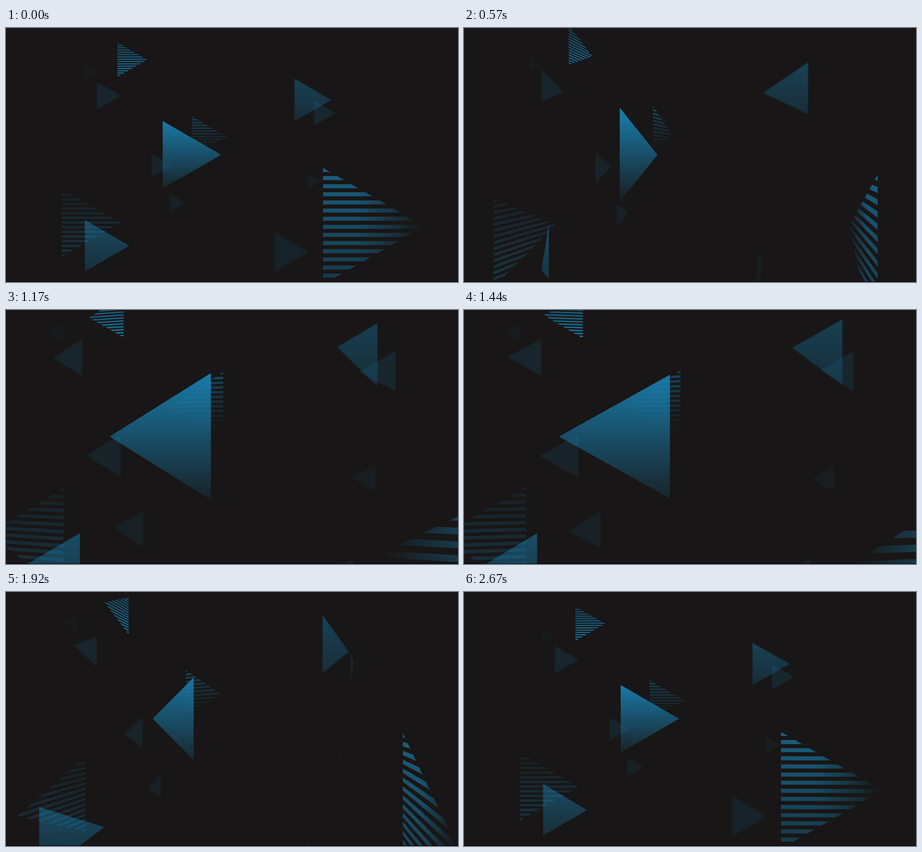
Recreate the animation shown at these times as an HTML page with a canvas. Size 998 px wide and 561 px high, loop 2700 ms.

```html
<!DOCTYPE html>
<html lang="en">
<head>
<meta charset="utf-8">
<title>Drifting triangles</title>
<style>
  html, body { margin: 0; width: 100%; height: 100%; overflow: hidden; background: #181616; }
  canvas { display: block; }
</style>
</head>
<body>
<canvas id="stage" width="998" height="561"></canvas>
<script>
const ctx = document.getElementById('stage').getContext('2d');
const W = 998, H = 561, CX = 499, CY = 280.5;
const FOCAL = 605, LOOP = 2700, HALF = LOOP / 2;
const BG = '24,22,22', BLUE = '26,126,173';

// x: flat edge, y: middle, h: height, k: approach at peak,
// a: alpha at top and bottom, turn: degrees in each half, gap: stripe period
const tri = (x, y, h, k, a, blur, extra = {}) =>
  ({ x, y, h, w: h * 0.866, k, a, blur, turn: [180, 180], ...extra });

const main = tri(346, 280, 149, 0.4755, [0.96, 0.13], 0.3);
const others = [
  tri(700, 438, 258, 0.435, [0.7, 0.32], 0.6, { gap: 17.95, fade: true }),
  tri(123, 430, 150, 0.336, [0.1, 0.27], 0.7, { gap: 10.3 }),
  tri(246, 70, 76, 0.218, [0.48, 0.9], 0.6, { gap: 5.1 }),
  tri(410, 240, 90, 0.414, [0.48, -0.1], 0.7, { gap: 6.2, turn: [180, -540] }),
  tri(174, 481, 114, 0.354, [0.52, 0.23], 0.6, { turn: [-180, 540] }),
  tri(637, 159, 94, 0.377, [0.42, 0.22], 0.8, { turn: [-540, 540] }),
  tri(680, 188, 56, 0.377, [0.16, 0.16], 1),
  tri(201, 149.5, 61, 0.264, [0.15, 0.15], 1.4),
  tri(172, 97, 36, 0.213, [0.06, 0.06], 2),
  tri(321, 303, 52, 0.475, [0.13, 0.13], 1.8),
  tri(361, 386, 42, 0.5, [0.11, 0.11], 2.2),
  tri(592, 495, 89, 0.375, [0.13, 0.13], 3.2),
  tri(666, 338, 38, 0.385, [0.08, 0.08], 2.2)
];

const smooth = s => s * s * (3 - 2 * s);

// cubic-bezier(.2, 0, .8, 1)
function softEase(x) {
  let lo = 0, hi = 1;
  for (let i = 0; i < 24; i++) {
    const s = (lo + hi) / 2, q = 1 - s;
    if (0.6 * s * q * q + 2.4 * s * s * q + s * s * s < x) lo = s; else hi = s;
  }
  return smooth(lo);
}

function pose(t) {
  if (t < HALF) {
    const e = smooth(t / HALF);
    return { zoom: e, angle: turn => turn[0] * e };
  }
  const e = softEase((t - HALF) / HALF);
  return { zoom: 1 - e, angle: turn => turn[0] + turn[1] * e };
}

function projector(s, state) {
  const rad = state.angle(s.turn) * Math.PI / 180;
  const cos = Math.cos(rad), sin = Math.sin(rad);
  const base = 1 - s.k * state.zoom;
  return (lx, ly) => {
    const dx = lx - s.w / 2;
    const depth = base + dx * sin / FOCAL;
    return [
      CX + (s.x + s.w / 2 - CX + dx * cos) / depth,
      CY + (s.y - s.h / 2 + ly - CY) / depth
    ];
  };
}

function addPolygon(points) {
  points.forEach(([x, y], i) => i ? ctx.lineTo(x, y) : ctx.moveTo(x, y));
  ctx.closePath();
}

function addStripes(s, at) {
  const reach = y => s.w * (1 - Math.abs(2 * y / s.h - 1));
  for (let y = 0; y < s.h; y += s.gap) {
    const end = Math.min(y + s.gap / 2, s.h);
    const mid = Math.min(Math.max(s.h / 2, y), end);
    addPolygon([
      at(0, y), at(reach(y), y), at(reach(mid), mid), at(reach(end), end), at(0, end)
    ]);
  }
}

const tint = (rgb, a) => `rgba(${rgb},${Math.max(0, a)})`;

function fadeTip(s, at) {
  const g = ctx.createLinearGradient(at(0, s.h / 2)[0], 0, at(s.w, s.h / 2)[0], 0);
  g.addColorStop(0.35, tint(BG, 0));
  g.addColorStop(0.7, tint(BG, 0.5));
  g.addColorStop(1, tint(BG, 1));
  ctx.fillStyle = g;
  ctx.beginPath();
  addPolygon([at(0, -6), at(s.w * 1.06, -6), at(s.w * 1.06, s.h + 6), at(0, s.h + 6)]);
  ctx.fill();
}

function drawTriangle(s, state) {
  const at = projector(s, state);
  const top = at(s.w / 2, 0)[1], bottom = at(s.w / 2, s.h)[1];
  const g = ctx.createLinearGradient(0, top, 0, bottom);
  for (let i = 0; i <= 4; i++) {
    g.addColorStop(i / 4, tint(BLUE, s.a[0] + (s.a[1] - s.a[0]) * i / 4));
  }
  ctx.fillStyle = g;
  ctx.filter = `blur(${s.blur}px)`;
  ctx.beginPath();
  if (s.gap) addStripes(s, at);
  else addPolygon([at(0, 0), at(s.w, s.h / 2), at(0, s.h)]);
  ctx.fill();
  ctx.filter = 'none';
  if (s.fade) fadeTip(s, at);
}

function draw(t) {
  const state = pose(t);
  ctx.fillStyle = `rgb(${BG})`;
  ctx.fillRect(0, 0, W, H);
  // At rest the large triangle covers its neighbours.
  const order = state.zoom < 0.001 ? [...others, main] : [others[0], main, ...others.slice(1)];
  order.forEach(s => drawTriangle(s, state));
  ctx.fillStyle = '#000';
  ctx.fillRect(0, H - 1, W, 1);
}

const start = performance.now();
function frame() {
  draw((performance.now() - start) % LOOP);
  requestAnimationFrame(frame);
}
frame();
</script>
</body>
</html>
```
